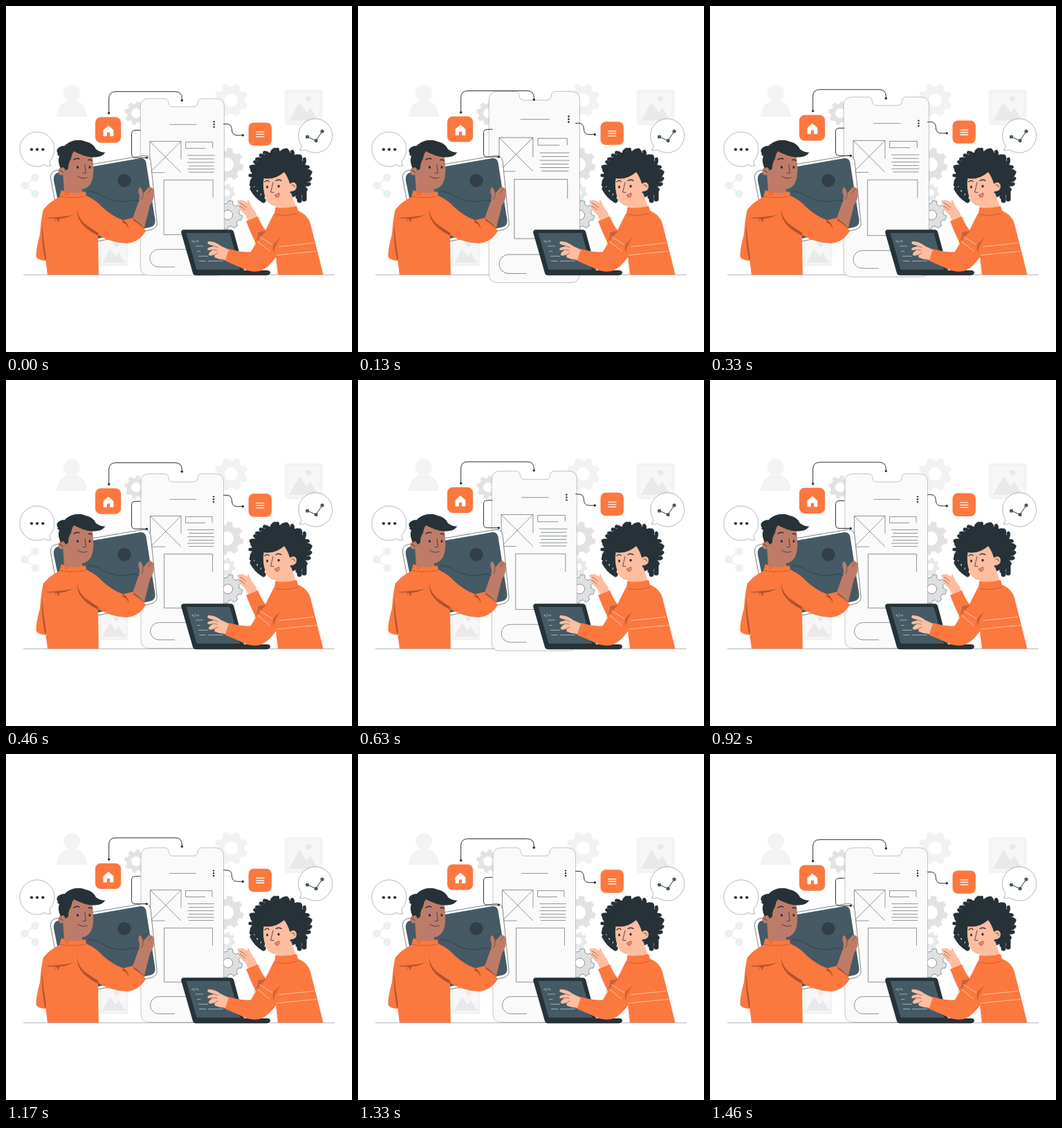
Recreate the animation shown at these times as an HTML page. Size 500x500 px, loop 1.5 s.

```html
<!DOCTYPE html>
<html lang="en">
<head>
<meta charset="utf-8">
<title>App wireframe</title>
<style>
html, body { margin: 0; width: 100%; height: 100%; overflow: hidden; background: #fff; }
svg { display: block; width: 100vw; height: 100vh; }
.o { fill: #fb783f; }
.d { fill: #263238; }
.s { fill: #455a64; }
.m { fill: #be7c68; }
.w { fill: #ffbd9f; }
.l { fill: none; stroke: #263238; stroke-linecap: round; stroke-linejoin: round; }
.t { fill: none; stroke: #263238; stroke-width: .5; }
.fold { fill: #b0532c; }
.seam { fill: none; stroke: #b0532c; stroke-width: .7; }
.stripe { fill: none; stroke: #fff; stroke-width: .7; stroke-opacity: .75; }
</style>
</head>
<body>
<svg viewBox="0 0 500 500">
  <!-- backdrop -->
  <g fill="#f3f3f3">
    <circle cx="95" cy="126" r="12"/>
    <path d="M73 160C74 145 82 139 89 137Q95 140 101 137C109 139 116 145 117 160Z"/>
    <path d="M403 120.500H457.500V172H403Z"/>
    <path d="M135 336H176.500V376H135Z"/>
  </g>
  <g fill="#f7f7f7">
    <path d="M408 125.500H452.500V167H408Z"/>
    <path d="M139 340H172.500V372H139Z"/>
  </g>
  <g fill="#e9e9e9">
    <path d="M409 166L424 139L434 154L440 148L452 166Z"/><circle cx="437" cy="134" r="4"/>
    <path d="M139 371L150 351L158 362L163 357L173 371Z"/><circle cx="160" cy="345" r="3.500"/>
  </g>
  <g fill="#efefef" stroke="#efefef" stroke-width="2">
    <path d="M42 248L27 259.500L42 271" fill="none"/>
    <circle cx="42" cy="248" r="4.800"/><circle cx="27" cy="259.500" r="4.800"/><circle cx="42" cy="271.500" r="4.800"/>
  </g>
  <g id="gears"></g>
  <path class="t" d="M25 388.500H475" stroke-opacity=".7"/>

  <!-- speech bubbles -->
  <g fill="#fff" stroke="#263238" stroke-width=".5" stroke-opacity=".7">
    <path d="M63.200 224A25 25 0 1 0 55.700 229.500Q60 232.500 65 231Q62.700 228 63.200 224Z"/>
    <path d="M427 201.500A24.500 24.500 0 1 1 433 207.500Q428 209.500 424 208Q427 205 427 201.500Z"/>
  </g>
  <g class="d"><circle cx="37" cy="207.300" r="2.100"/><circle cx="45" cy="207.300" r="2.100"/><circle cx="53.300" cy="207.300" r="2.100"/></g>
  <path class="l" d="M435.500 189L448 194.500L457 181"/>
  <g class="s"><circle cx="435.500" cy="189" r="2.600"/><circle cx="448" cy="194.500" r="2.600"/><circle cx="457" cy="181" r="2.600"/></g>

  <!-- phone -->
  <g id="phone">
    <path d="M195 147.300Q195 135.600 207 135.600H229Q234.500 135.600 235 141.300Q235.500 147.300 241 147.300H270Q276.500 147.300 277 141.300Q277.500 135.600 283 135.600H303Q314.500 135.600 314.500 147.300V375.300Q314.500 387.500 303 387.500H207Q195 387.500 195 375.300Z" fill="#fafafa" stroke="#263238" stroke-width=".5" stroke-opacity=".55"/>
    <g class="t">
      <path d="M236.500 172.500H275"/>
      <path d="M208.500 196.500H253V222M208.500 196.500V241H230M208.500 196.500L253 241M253 196.500L208.500 241"/>
      <path d="M298 206.500V197.500H259.500V206.500H288"/>
      <path d="M262 216.500H301M264 221.500H300M262 226.500H301M264 231.500H300M262 236H301M264 240.500H300"/>
      <path d="M298.500 277V251.500H228.500V329.500H262"/>
      <path d="M264 350.500H221A12.500 12.500 0 0 0 221 375.500H244"/>
    </g>
    <g class="d"><circle cx="300" cy="168.600" r="1.200"/><circle cx="300" cy="172.300" r="1.200"/><circle cx="300" cy="176" r="1.200"/></g>
  </g>

  <!-- tablet -->
  <path d="M73 237.500L198 216.300Q207 215 209 224L218 312Q219 320 211 323L92 349Q84 350 82 342L64.500 249Q63.500 239.500 73 237.500Z" fill="#fff" stroke="#263238" stroke-width=".6"/>
  <path class="s" d="M76 240.500L194 220Q201 219 202.500 226.500L215.500 309Q216.500 317 209 319.500L96 344Q88 345 86 337L69 252Q68 242 76 240.500Z"/>
  <circle cx="171" cy="252.300" r="9.500" fill="#323f46"/>
  <path class="l" d="M118 268C135 267 140 279 160 282S180 277 192 282" stroke-width=".6"/>

  <!-- man -->
  <path class="m" d="M181 313L190 287Q195 278 191.500 269Q191 263 194 262Q197 265 198 271L206 262Q209 260 211 263Q215 264 214 270Q214 280 208 288L199 324Z"/>
  <path class="l" d="M198 271Q199 276 196 280M206 270L210 264" stroke-width=".5"/>
  <path class="m" d="M82 236L84 270Q98 280 113 273L109 264Z"/>
  <path class="m" d="M86 215Q104 203 124 214Q127 228 126 243Q125 258 116 263Q106 268 96 260Q86 253 83 244Q76 246 75.500 239Q76 232 83 234Z"/>
  <path class="d" d="M75 213C71 209 75 202 85 202C91 195 105 191 115 196C122 197 128 202 130 207Q137 212 143.500 211.500Q138 219 127 218.500C116 219 107 214 98 210Q95 214 94 221Q90 226 90 235L86 238Q84 231 79 235Q74 224 77 217Q73 215 75 213Z"/>
  <path class="l" d="M98 222Q102 219 106 221M119 222.500Q122 221 124 223.500" stroke-width="1.400"/>
  <ellipse class="d" cx="103.500" cy="233" rx="1.600" ry="2"/><ellipse class="d" cx="121" cy="233" rx="1.500" ry="2"/>
  <path class="l" d="M114 229L115.500 241Q113 243 111 241M104 246Q110 251 117 248M78 238Q81 237 82 241" stroke-width=".8"/>
  <path class="o" d="M80 266Q96 274 115 268L116 274Q131 281 140 291.500Q154 304 169 309.500L184 306Q194 315 202 325Q192 342 174 343Q152 342 133 331L134 388.300H60L57.500 368Q46 368 43.500 362Q43 352 49 330Q51 305 54 294Q64 282 77 276Z"/>
  <path class="fold" d="M52 314Q54 340 58 364L56.500 368Q51 340 52 314ZM104 281Q99 301 114 315L133.500 328V332Q106 319 103 300Q102 290 104 281ZM57 306Q75 306 97 302Q86 307 78 307L75 313L74 307L70 312L72 307Q64 308 57 306ZM169 309Q178 315 177 322Q175 315 168 313ZM184 307Q197 316 200 322Q192 315 184 310Z"/>
  <path class="seam" d="M77 275Q95 279 115 275M86 267V272Q88 274 90 271V268"/>

  <!-- woman -->
  <g id="curls" class="l"></g>
  <path class="w" d="M391 280L389 296Q405 302 420 293L412 270Z"/>
  <path class="w" d="M372.500 249Q388 252 402 240Q408 248 410 257Q418 252 420 260Q420 268 411 268Q409 283 395 289Q382 291 376 280Q370 265 372.500 249Z"/>
  <path class="l" d="M374 254Q377 251 380 253.500M390 252.500Q394 250 398 252.500" stroke-width="1.300"/>
  <ellipse class="d" cx="377.500" cy="261.500" rx="1.400" ry="1.900"/><ellipse class="d" cx="394" cy="260.500" rx="1.500" ry="1.900"/>
  <path class="l" d="M386 255L382.500 269L387 269.500M413 259Q417 257 417 262" stroke-width=".8"/>
  <path d="M388.500 273Q392 272 394.500 270Q396 275 392.500 276.500Q389 276.500 388.500 273Z" fill="#fb8a5c" stroke="#263238" stroke-width=".5"/>
  <path class="w" d="M352 314L346 302Q337 294 338 288Q333 284 335 281Q342 279 349 284Q348 279 351 281Q354 290 360 297L365 308Z"/>
  <path class="l" d="M338 285Q343 286 347 291M338 289Q342 291 345 295" stroke-width=".5"/>
  <path class="o" d="M347 311L364 304Q368 315 375 324L386 302Q389 299 389 291Q405 293 420 289L422 296Q436 301 440 315L458.500 388.300H393L390 363L361 343Q353 327 347 311Z"/>
  <path class="seam" d="M390 301Q405 305 422 299"/>
  <path class="stripe" d="M392 348L445 342.500M391 360L449 354.500"/>

  <!-- laptop -->
  <path class="d" d="M257 323.300H325Q328 323.300 329 326L344 382H377Q382 382 382 385.500Q381 389.300 376 389.300H275Q271 389.300 270 386L253.300 328Q252.500 323.300 257 323.300Z"/>
  <path class="s" d="M260.500 328H323.500L338 381H275.500Z"/>
  <text x="268" y="342" font-family="'DejaVu Sans Mono', monospace" font-size="6" font-style="italic" fill="#dfe5e8">&lt;/&gt;</text>
  <path d="M274 347H285M276 354.500H281M278 361.500H292M279 368.500H289M292 368.500H314" fill="none" stroke="#dfe5e8" stroke-width=".6"/>
  <path class="o" d="M316 368L322 351Q345 357 354 355L361 343L375 324L398 334L390 363Q380 378 367 383Q352 386 337 377Z"/>
  <path class="fold" d="M364 327L376 325L366 336Q362 342 358 344Q365 335 364 327ZM398 334Q387 345 387 358Q384 349 388 342Z" opacity=".6"/>
  <path class="stripe" d="M366 333L385 345M362 339L381 354"/>
  <path class="w" d="M322 352L311 347Q302 340 293 340Q290 341 292 344L301 347L293 349Q290 351 292 353L300 352Q292 356 293 360Q296 362 302 359Q300 363 303 364Q310 367 317 367Z"/>
  <path class="l" d="M301 347L306 349M300 352L305 353M302 359L306 357" stroke-width=".5"/>

  <!-- floating links -->
  <g id="links">
    <g class="l" stroke-width="1">
      <path d="M148.700 154.500V133.500Q148.700 123.500 158.700 123.500H244.500Q254.300 123.500 254.300 133.500V136.200"/>
      <path d="M314.500 170.300H319Q326 170.300 326.300 178Q326.500 186.600 334 186.600H342"/>
      <path d="M194 179.200H187Q181.500 179.200 181.500 184.500V213.500Q181.500 219 187 219H203"/>
    </g>
    <g class="d"><circle cx="148.700" cy="154.600" r="1.700"/><circle cx="254.300" cy="136.200" r="1.700"/><circle cx="342.300" cy="186.600" r="1.700"/><circle cx="203.300" cy="219" r="1.700"/></g>
    <rect class="o" x="129" y="160.300" width="37.200" height="37.200" rx="8"/>
    <path d="M148 172.800L155 179V187.500H150.500V182H145.500V187.500H141V179Z" fill="#fff" stroke="#fff" stroke-width=".8" stroke-linejoin="round"/>
    <rect class="o" x="350.500" y="168.200" width="33.400" height="33.400" rx="7.500"/>
    <path d="M361.500 181.700H373.200M361.500 185.200H373.200M361.500 188.700H373.200" stroke="#fff" stroke-width="1.400"/>
  </g>
</svg>
<script>
const $ = id => document.getElementById(id);

function add(parent, tag, attrs) {
  const el = document.createElementNS('http://www.w3.org/2000/svg', tag);
  for (const k in attrs) el.setAttribute(k, attrs[k]);
  parent.append(el);
}

function gear(cx, cy, r, hole, fill, turn = .2, line = 'none') {
  const teeth = 8, step = 2 * Math.PI / teeth, pts = [];
  for (let i = 0; i < teeth; i++)
    for (const [a, k] of [[-.32, .8], [-.2, 1], [.2, 1], [.32, .8]]) {
      const q = (i + a) * step + turn;
      pts.push((cx + r * k * Math.cos(q)).toFixed(1) + ',' + (cy + r * k * Math.sin(q)).toFixed(1));
    }
  const edge = { stroke: line, 'stroke-width': .6, 'stroke-linejoin': 'round' };
  add($('gears'), 'polygon', { points: pts.join(' '), fill, ...edge });
  add($('gears'), 'circle', { cx, cy, r: hole, fill: '#fff', ...edge });
}
gear(188, 155, 17, 7, '#e2e2e2');
gear(325.500, 136, 24.500, 9.500, '#f2f2f2', Math.PI / 8);
gear(319, 229, 24.500, 10, '#e2e2e2');
gear(318.500, 270, 13, 5, '#e8e8e8');
gear(320.500, 302, 21, 7, '#e0e0e0', .2, '#455a64');

// curly hair: a full core with short bent locks all around
const hair = { cx: 396, cy: 245, rx: 41, ry: 35.500 };
add($('curls'), 'ellipse', { ...hair, fill: '#263238', stroke: 'none' });
let seed = 7;
const rnd = () => (seed = seed * 16807 % 2147483647) / 2147483647;
for (let i = 0; i < 34; i++) {
  const a = i / 34 * 2 * Math.PI, bend = (rnd() - .5) * .25, tip = 1.03 + rnd() * .06;
  const at = (k, turn) => (hair.cx + hair.rx * k * Math.cos(a + turn)).toFixed(1) + ' ' +
    (hair.cy + hair.ry * k * Math.sin(a + turn)).toFixed(1);
  if (Math.sin(a) < .88)
    add($('curls'), 'path', { d: `M${at(.8, 0)}Q${at(1, -bend)} ${at(tip, bend)}`, 'stroke-width': 4.500 + rnd() * 1.500 });
}
add($('curls'), 'path', { d: 'M356 264Q362 275 372 281M431 264V279M423 268L424 281', 'stroke-width': 7 });

// [time, scale]
const beat = [[0, 1], [150, 1.1], [450, 1], [600, 1], [750, 1.1], [900, 1], [1500, 1]];
// [time, y offset]
const drift = [[0, .4], [750, -6.27], [1500, .4]];

function value(keys, t) {
  const i = keys.findIndex(k => k[0] > t), [t0, v0] = keys[i - 1], [t1, v1] = keys[i];
  return v0 + (v1 - v0) * (t - t0) / (t1 - t0);
}

const loop = 1500, tick = 1000 / 24;
let start;

function draw(now) {
  start ??= now;
  // the picture advances 24 times a second
  const n = Math.floor(((now - start) % loop + 3.4) / tick) % 36;
  const t = (n + .5) * tick;
  $('phone').setAttribute('transform', `translate(254.700 261.500) scale(${value(beat, t)}) translate(-254.700 -261.500)`);
  $('links').setAttribute('transform', `translate(0 ${value(drift, t)})`);
  requestAnimationFrame(draw);
}
draw(performance.now());
</script>
</body>
</html>
```
